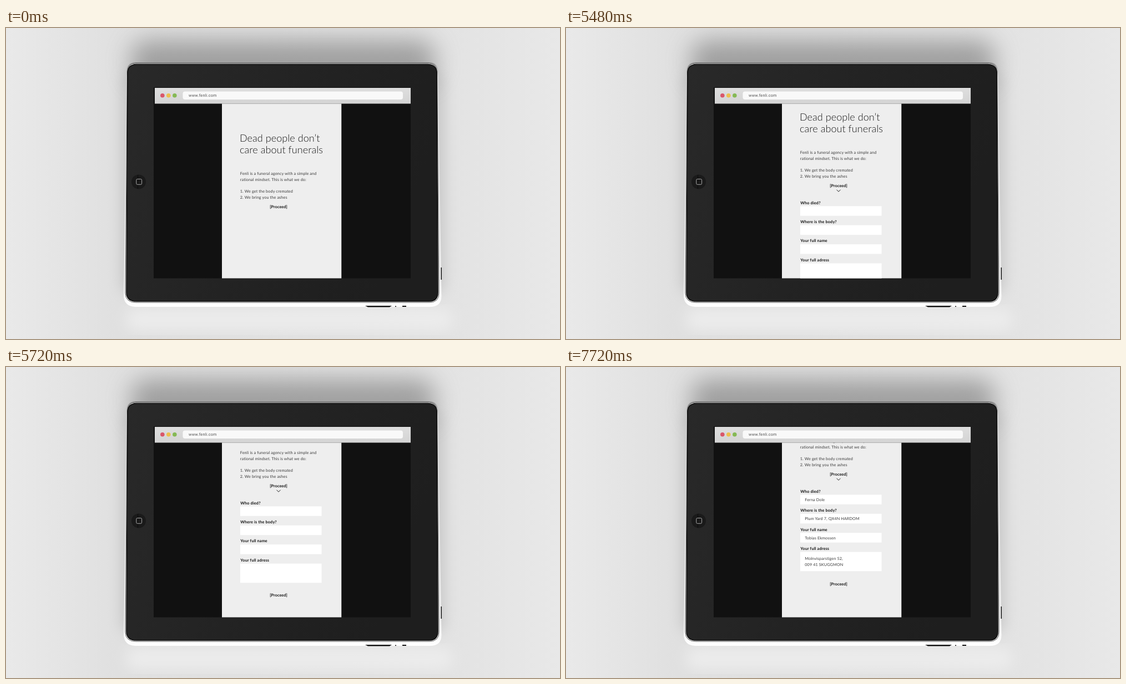
An HTML page for the animation above (8000 ms loop, 998x561 px).

```html
<!DOCTYPE html>
<html lang="en">
<head>
<meta charset="utf-8">
<title>Tablet form</title>
<style>
html, body { margin: 0; width: 100%; height: 100%; overflow: hidden; background: #e6e6e6; }
svg { display: block; width: 100vw; height: 100vh; }
text { font: 7.2px Lato, "Open Sans", sans-serif; letter-spacing: .14px; fill: #3a3a3a; text-rendering: geometricPrecision; }
.title { font-size: 18px; font-weight: 300; letter-spacing: .06px; fill: #161616; }
.label { font-weight: 700; letter-spacing: .2px; fill: #111; }
.button { font-weight: 700; letter-spacing: .1px; fill: #111; text-anchor: middle; }
.url { font-family: Roboto, Inter, sans-serif; letter-spacing: .25px; fill: #505050; }
</style>
</head>
<body>
<svg viewBox="0 0 998 561">
  <defs>
    <linearGradient id="wall">
      <stop offset="0" stop-color="#e9e9e9"/>
      <stop offset=".2" stop-color="#e0e0e0"/>
      <stop offset=".8" stop-color="#e3e3e3"/>
      <stop offset="1" stop-color="#e8e8e8"/>
    </linearGradient>
    <linearGradient id="rim" x2="0" y2="1">
      <stop offset="0" stop-color="#8e8e8e"/>
      <stop offset=".06" stop-color="#d6d6d6"/>
      <stop offset=".9" stop-color="#f2f2f2"/>
      <stop offset="1" stop-color="#fff"/>
    </linearGradient>
    <linearGradient id="bezel" x2="1" y2=".3">
      <stop offset="0" stop-color="#292929"/>
      <stop offset="1" stop-color="#1e1e1e"/>
    </linearGradient>
    <linearGradient id="bar" x2="0" y2="1">
      <stop offset="0" stop-color="#dedede"/>
      <stop offset="1" stop-color="#d4d4d4"/>
    </linearGradient>
    <filter id="soft" x="-30%" y="-150%" width="160%" height="400%"><feGaussianBlur stdDeviation="22"/></filter>
    <filter id="haze" x="-20%" y="-20%" width="140%" height="140%"><feGaussianBlur stdDeviation="12"/></filter>
    <clipPath id="view"><rect x="389" y="136.5" width="215.5" height="315"/></clipPath>
  </defs>

  <!-- backdrop and shadows -->
  <rect width="998" height="561" fill="url(#wall)"/>
  <rect x="216" y="506" width="590" height="40" rx="20" fill="#ececec" filter="url(#haze)"/>
  <rect x="208" y="80" width="582" height="400" rx="20" fill="#8a8a8a" opacity=".3" filter="url(#haze)"/>
  <rect x="225" y="22" width="548" height="80" rx="30" fill="#777" opacity=".62" filter="url(#soft)"/>

  <!-- tablet -->
  <path d="M234 62H762Q777 62 778.500 78L784.500 484Q784 503 764 503H233Q212 502 212 482L217 78Q218 62 234 62Z" fill="url(#rim)"/>
  <path d="M234 63.500H761Q775 64 776.500 79L780 478Q780 495 763 495H234Q215 495 215 478L218.500 79Q219 64 234 63.500Z" fill="#fafafa" stroke="#555" stroke-width="1"/>
  <path d="M235 65.500H760Q775 66 776 80L778 477Q778 493 762 493H235Q217 493 217 477L219 80Q220 66 235 65.500Z" fill="url(#bezel)" stroke="#0b0b0b" stroke-width="1.500"/>
  <path d="M647 501H695L691 503.500H652ZM701 501.500h2v1.500h-2ZM714 501h7v2h-7ZM783.500 432h1.500v22h-1.500Z" fill="#151515"/>
  <circle cx="239" cy="277.500" r="13" fill="#1a1a1a"/>
  <path d="M237.500 265v25" stroke="#0d0d0d"/>
  <rect x="234.800" y="272.500" width="9.800" height="9.800" rx="2" fill="none" stroke="#a8a8a8"/>

  <!-- browser -->
  <rect x="266" y="107" width="463" height="344.500" fill="#111"/>
  <rect x="268" y="108" width="461" height="28.500" fill="url(#bar)"/>
  <circle cx="281.800" cy="121.700" r="3.800" fill="#d9566a"/>
  <circle cx="292.800" cy="121.700" r="3.800" fill="#edc04e"/>
  <circle cx="303.800" cy="121.700" r="3.800" fill="#85b955"/>
  <rect x="318.500" y="114.500" width="396.500" height="14.500" rx="4" fill="#f9f9f9"/>
  <text class="url" x="329" y="124.300">www.fenli.com</text>

  <g clip-path="url(#view)">
    <rect x="389" y="136" width="215.500" height="316" fill="#eee"/>
    <g id="page">
      <text class="title" x="421" y="205">Dead people don’t</text>
      <text class="title" x="421" y="226.400">care about funerals</text>
      <text x="421.800" y="265">Fenli is a funeral agency with a simple and</text>
      <text x="421.800" y="275.800">rational mindset. This is what we do:</text>
      <text x="421.800" y="297.400">1. We get the body cremated</text>
      <text x="421.800" y="308.200">2. We bring you the ashes</text>
      <text class="button" x="491" y="325">[Proceed]</text>
      <g id="form">
        <path d="M487.500 329.800L491 333.300L494.500 329.800" fill="none" stroke="#222"/>
        <text class="button" x="491" y="522.500">[Proceed]</text>
      </g>
    </g>
  </g>
</svg>
<script>
const LOOP = 8000, STEP = 40, SCROLL = 129;
const [page, form] = ['page', 'form'].map(id => document.getElementById(id));
const clamp = v => Math.min(1, Math.max(0, v));

const fields = [
  ['Who died?', 'Ferna Dole'],
  ['Where is the body?', 'Plum Yard 7, QX4N HARDOM'],
  ['Your full name', 'Tobias Ekmossen'],
  ['Your full adress', 'Molnvisparstigen 52,', '009 41 SKUGGMON']
];
form.innerHTML += fields.map(([label, ...lines], i) => {
  const y = 355.7 + i * 34.4, tall = lines.length > 1;
  return `<text class="label" x="422.3" y="${y}">${label}</text>
    <rect x="422" y="${y + 3.7}" width="146.5" height="${tall ? 34.7 : 17.4}" fill="#fff"/>` +
    lines.map((line, n) =>
      `<text class="answer" x="430.3" y="${y + (tall ? 18.1 : 15) + n * 10.8}">${line}</text>`).join('');
}).join('');
const answers = form.querySelectorAll('.answer');

function draw() {
  const t = Math.floor(performance.now() % LOOP / STEP) * STEP;
  const eased = 1 - (1 - clamp((t - 5400) / 640)) ** 2.62;
  page.setAttribute('transform', `translate(0 ${-SCROLL * eased})`);
  form.setAttribute('visibility', t < 5400 ? 'hidden' : 'visible');
  const fade = clamp((t - 7360) / 360);
  answers.forEach(a => a.setAttribute('opacity', fade));
  requestAnimationFrame(draw);
}
draw();
</script>
</body>
</html>
```
